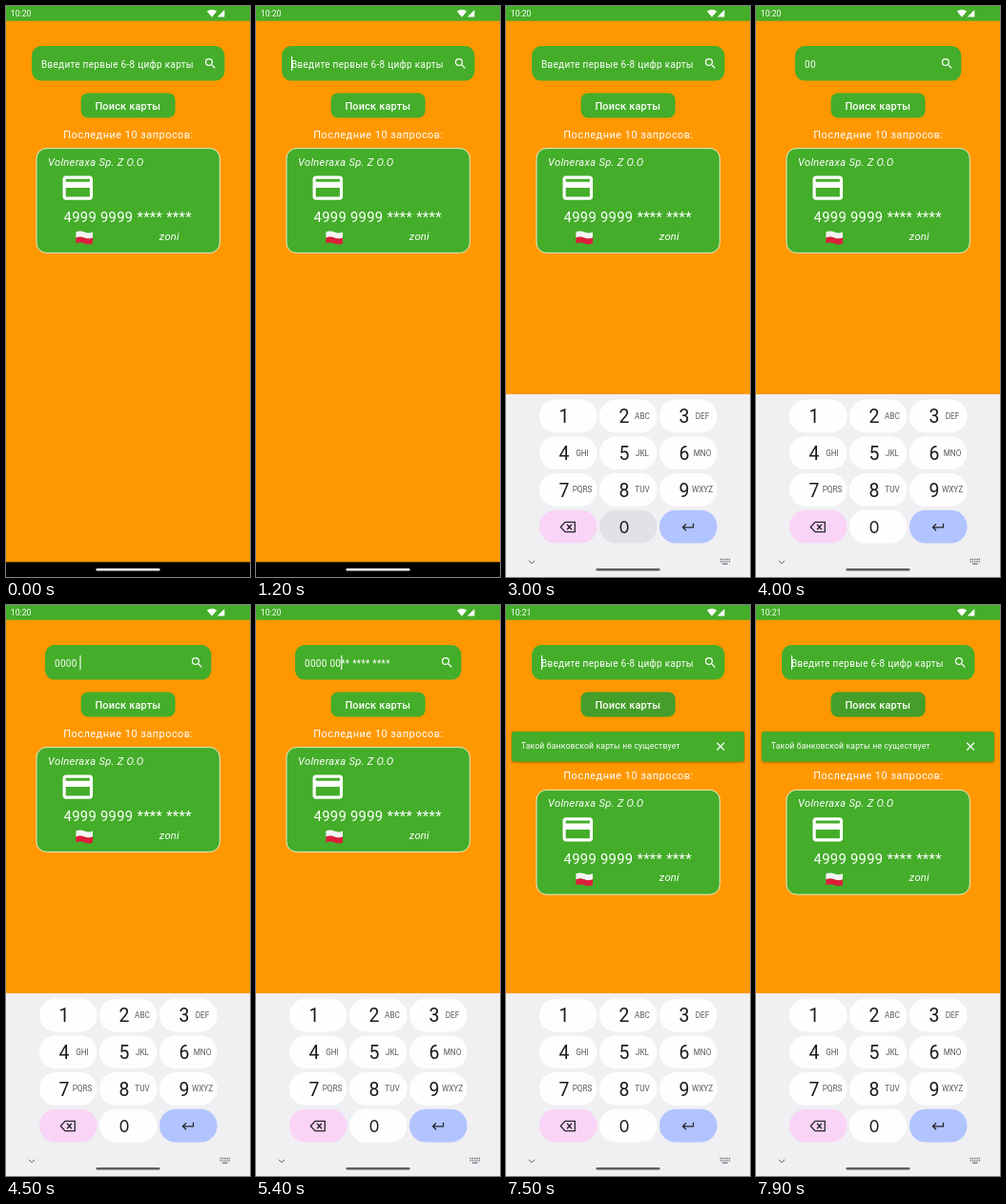
An HTML page that plays this animation: 256 by 600 pixels, repeating every 8 s.

```html
<!DOCTYPE html>
<html lang="ru">
<head>
<meta charset="utf-8">
<title>Поиск карты</title>
<style>
  html, body { margin: 0; width: 100%; height: 100%; overflow: hidden; background: #ff9800; }
  svg { display: block; width: 100vw; height: 100vh; }
  text { font-family: Roboto, "Noto Sans", sans-serif; fill: #fff; white-space: pre; }
  .green { fill: #44ad2a; }
  .white { fill: #fff; }
  .input { font-size: 10px; letter-spacing: .29px; }
  .italic { font-style: italic; font-size: 11.2px; letter-spacing: .28px; }
  .digit { font-size: 19.4px; fill: #1b1b1f; text-anchor: middle; }
  .zero { font-family: Inter, sans-serif; font-size: 17.6px; }
  .letters { font-size: 8.2px; fill: #5b5b60; text-anchor: middle; }
  .line { fill: none; stroke: #26262b; stroke-width: 1.3; }
  #snackbar { filter: drop-shadow(0 1px 1.2px rgba(70, 60, 0, .5)); }
</style>
</head>
<body>
<svg viewBox="0 0 256 600">
  <rect width="256" height="600" fill="#ff9800"/>
  <rect class="green" width="256" height="15.7"/>
  <text id="clock" x="4.8" y="11.2" font-size="8.7"></text>
  <path class="white" d="M210.8 5.6Q216 1.8 221.2 5.6L216 11.8ZM229.3 4V11.6H221.7Z"/>

  <rect id="field" class="green" y="42" height="36.6" rx="10"/>
  <text id="input" class="input" y="64.7"></text>
  <path id="search" class="white" d="M15.5 14h-.79l-.28-.27A6.47 6.47 0 0 0 16 9.5 6.5 6.5 0 1 0 9.5 16c1.61 0 3.09-.59 4.23-1.57l.27.28v.79l5 4.99L20.49 19zm-6 0a4.5 4.5 0 1 1 0-9 4.5 4.5 0 0 1 0 9z"/>
  <rect id="cursor" class="white" y="53" width="1.1" height="15"/>

  <rect class="green" x="78.6" y="91.4" width="99" height="26.1" rx="7.5"/>
  <rect id="ripple" x="78.6" y="91.4" width="99" height="26.1" rx="7.5" fill="#47802a"/>
  <text x="93.4" y="108.8" font-size="10.9" font-weight="500" letter-spacing=".2">Поиск карты</text>

  <g id="snackbar">
    <rect class="green" x="6" y="133" width="244" height="31.5" rx="2.5"/>
    <text x="15.8" y="151.3" font-size="8.65" letter-spacing=".16">Такой банковской карты не существует</text>
    <path d="M221.2 144.8l7.8 7.8m0-7.8l-7.8 7.8" stroke="#fff" stroke-width="1.3"/>
  </g>

  <g id="history">
    <text x="60.2" y="138.7" font-size="11" letter-spacing=".46">Последние 10 запросов:</text>
    <rect class="green" x="32" y="149.6" width="192.3" height="109.8" rx="10.5" stroke="#e9f6df" stroke-width=".9"/>
    <text class="italic" x="44" y="167.5">Volneraxa Sp. Z O.O</text>
    <path class="white" transform="translate(56.4 172.2) scale(1.575)" d="M20 4H4c-1.11 0-2 .89-2 2v12c0 1.11.89 2 2 2h16c1.11 0 2-.89 2-2V6c0-1.11-.89-2-2-2zm0 14H4v-6h16v6zm0-10H4V6h16v2z"/>
    <text x="60.5" y="227.2" font-size="14.8" letter-spacing=".31">4999 9999 **** ****</text>
    <path fill="#f4f4f4" d="M73.4 237.5q4.4-1.8 8.8 0t8.8 0v6.2q-4.4 1.8-8.8 0t-8.8 0z"/>
    <path fill="#dc1f3b" d="M73.4 243.5q4.4-1.8 8.8 0t8.8 0v6q-4.4 1.8-8.8 0t-8.8 0z"/>
    <text class="italic" x="160.8" y="245.7">zoni</text>
  </g>

  <rect y="584.3" width="256" height="15.7"/>
  <g id="keyboard">
    <rect y="408" width="256" height="230" fill="#f0eff2"/>
    <g id="keys"></g>
    <path class="line" d="M62 542.3H72.3V552.7H62L57.3 547.5ZM64 544.8l5 5.4m0-5.4l-5 5.4"/>
    <path class="line" d="M196.5 543.8V547.8H185.5M189 544.3L185.5 547.8L189 551.3"/>
    <path d="M24 582.8l3 3 3-3" fill="none" stroke="#55555a"/>
    <path d="M224.5 581.5h10.5M224.5 583.8h10.5" stroke="#66666b" stroke-width="1.3" stroke-dasharray="1.3 1"/>
    <path d="M227 586.2h5.5" stroke="#66666b" stroke-width="1.2"/>
  </g>
  <rect id="handle" x="94.5" y="591.1" width="67" height="2.4" rx="1.2"/>
</svg>
<script>
const LOOP = 8000;
const FOCUS = 1050, KEYBOARD_IN = 1950, MINUTE = 6150, TAP_SEARCH = 7150, ERROR = 7450;
const TYPED = [3050, 3450, 4150, 4450, 5050, 5350, 5950, 6250];
const HINT = 'Введите первые 6-8 цифр карты';
const $ = id => document.getElementById(id);
const clamp = v => Math.max(0, Math.min(1, v));

function set(id, attrs) {
  for (const name in attrs) $(id).setAttribute(name, attrs[name]);
}
function show(id, visible) {
  $(id).style.display = visible ? '' : 'none';
}

function buildKeys() {
  const labels = ['', 'ABC', 'DEF', 'GHI', 'JKL', 'MNO', 'PQRS', 'TUV', 'WXYZ'];
  const digits = [1, 2, 3, 4, 5, 6, 7, 8, 9, '', 0, ''];
  const fills = { 9: '#f9d4f6', 11: '#b1c4ff' };
  $('keys').innerHTML = digits.map((digit, i) => {
    const x = 35 + i % 3 * 63, y = 413.7 + Math.floor(i / 3) * 38.7;
    return `<rect id="key${i}" x="${x}" y="${y}" width="60.5" height="34.7" rx="17" fill="${fills[i] || '#fefefe'}"/>
      <text class="digit ${digit === 0 ? 'zero' : ''}" x="${x + 26}" y="${y + 24.4}">${digit}</text>
      <text class="letters" x="${x + 45}" y="${y + 20.3}">${labels[i] || ''}</text>`;
  }).join('');
}

function cardMask(count) {
  return '0'.repeat(count).padEnd(count > 5 ? 16 : count, '*').replace(/.{4}/g, '$& ');
}

function drawField(t) {
  const count = t < ERROR ? TYPED.filter(at => t >= at).length : 0;
  const left = count ? 41 : 27;
  set('field', { x: left, width: 256.4 - 2 * left });
  set('input', { x: left + 10 });
  set('search', { transform: `translate(${count ? 193 : 207} 53) scale(.625)` });
  $('input').textContent = count ? cardMask(count) : HINT;

  const lastReset = [FOCUS, ...TYPED, ERROR].filter(at => t >= at).pop();
  show('cursor', lastReset !== undefined && Math.floor((t - lastReset) / 500) % 2 === 0);
  const caret = count + Math.floor(count / 4);
  set('cursor', { x: count ? $('input').getEndPositionOfChar(caret - 1).x : 37 });
}

function drawKeyboard(t) {
  const left = 1 - clamp((t - KEYBOARD_IN) / 334);
  show('keyboard', t >= KEYBOARD_IN);
  set('keyboard', { transform: `translate(0 ${192 * left ** 3})` });
  const pressed = TYPED.some(at => t >= at - 100 && t < at);
  set('key10', { fill: pressed ? '#e2e1e6' : '#fefefe' });
  const shade = Math.round(255 - 160 * clamp((t - 2150) / 200));
  set('handle', { fill: `rgb(${shade},${shade},${shade})` });
}

function render(t) {
  $('clock').textContent = t < MINUTE ? '10:20' : '10:21';
  drawField(t);
  drawKeyboard(t);
  set('ripple', { opacity: .35 * clamp((t - TAP_SEARCH) / 150) });
  show('snackbar', t >= ERROR);
  set('history', { transform: `translate(0 ${t >= ERROR ? 44.8 : 0})` });
}

buildKeys();
const start = performance.now();
function tick() {
  render((performance.now() - start) % LOOP);
  requestAnimationFrame(tick);
}
tick();
</script>
</body>
</html>
```
